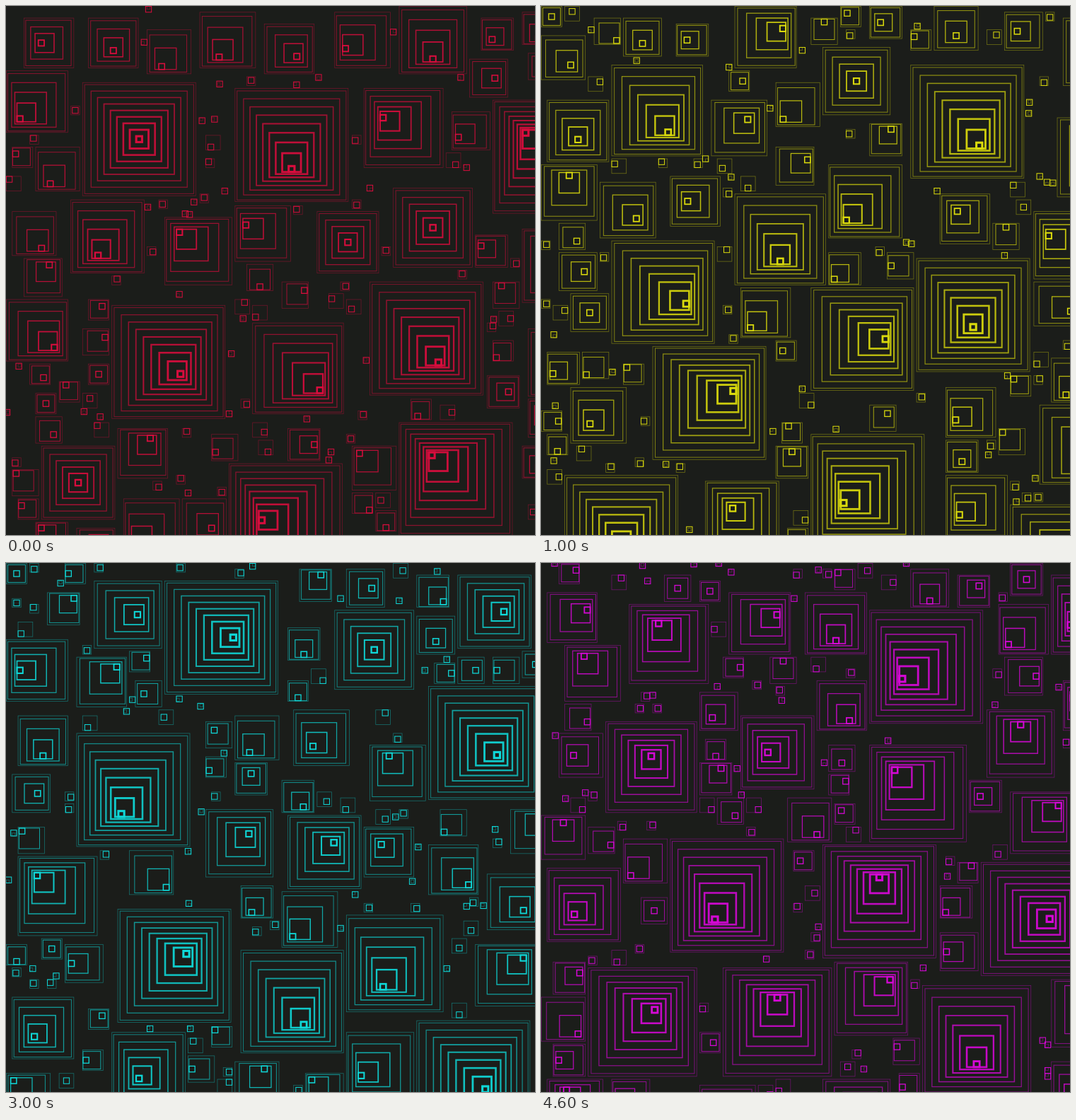
An HTML page with a canvas for the animation above (5000 ms loop, 748 by 748 pixels).

```html
<!DOCTYPE html>
<html lang="en">
<head>
<meta charset="utf-8">
<title>Nested squares</title>
<style>
  html, body { margin: 0; width: 100%; height: 100%; overflow: hidden; background: #1b1d1a; }
  canvas { display: block; }
</style>
</head>
<body>
<canvas id="stage" width="748" height="748"></canvas>
<script>
const SIZE = 748, UNIT = 8.29, CELLS = 90, HOLD = 1000;
const LARGEST = 19.8, LARGEST_FILL = 14;
const ctx = document.getElementById('stage').getContext('2d');

// Only the anchors are placed by hand, by size: column, row, drift.
// Drift has two digits, vertical then horizontal, 0 to 4, with 2 as the middle.
const scenes = [
  {
    color: '#d80d3d',
    anchors: {
      20: [13,13,22, 39,14,42, 83,16,0, 18,51,33, 62,47,43, 38,78,20, 67,71,0],
      16: [42,54,44]
    }
  },
  {
    color: '#dada0c',
    anchors: {
      20: [63,10,43, 64,43,32, 46,73,30, 4,80,32, 19,58,14],
      18: [12,40,34, 46,48,24],
      16: [12,10,43, 33,32,42]
    }
  },
  {
    color: '#dedede',
    anchors: {
      20: [32,4,4, 3,21,21, 81,15,12, 49,58,4, 18,58,41, 72,52,32],
      19: [25,28,22],
      18: [11,1,14],
      17: [58,35,1]
    }
  },
  {
    color: '#0fd8d8',
    anchors: {
      20: [27,3,23, 72,21,33, 12,29,41, 19,59,13, 70,78,33],
      18: [40,66,43],
      17: [58,60,41]
    }
  },
  {
    color: '#d608d6',
    anchors: {
      20: [56,8,30, 22,47,41, 48,48,2, 75,51,23],
      19: [8,69,13, 31,69,2, 65,72,42],
      17: [56,31,0],
      16: [11,27,12]
    }
  }
];

function seeded(seed) {
  return () => {
    seed = (seed + 0x6d2b79f5) | 0;
    let t = Math.imul(seed ^ (seed >>> 15), 1 | seed);
    t = (t + Math.imul(t ^ (t >>> 7), 61 | t)) ^ t;
    return ((t ^ (t >>> 14)) >>> 0) / 4294967296;
  };
}

function layout(anchors, seed) {
  const random = seeded(seed);
  const pick = n => Math.floor(random() * n);
  const used = new Set(), list = [];

  const cells = (x, y, n) => {
    const keys = [];
    for (let j = y; j < y + n; j++)
      for (let i = x; i < x + n; i++) keys.push(j * 200 + i);
    return keys;
  };
  const place = (x, y, n, mx, my) => {
    cells(x, y, n).forEach(key => used.add(key));
    list.push({ x, y, n: Math.min(n, LARGEST), mx, my });
  };

  for (const [n, row] of Object.entries(anchors))
    for (let i = 0; i < row.length; i += 3) {
      const drift = row[i + 2];
      place(row[i], row[i + 1], +n, drift % 10 - 2, Math.floor(drift / 10) - 2);
    }

  // Fill the gaps from large to small; smaller squares are more common.
  for (let n = LARGEST_FILL; n > 0; n--) {
    let count = Math.min(30, Math.round(56 / n ** 1.2));
    for (let tries = 0; count > 0 && tries < 1500; tries++) {
      const x = pick(CELLS), y = pick(CELLS);
      if (cells(x, y, n).some(key => used.has(key))) continue;
      place(x, y, n, pick(5) - 2, pick(5) - 2);
      count--;
    }
  }
  return list;
}

// Each inner square is smaller by one step and leans further along its drift.
function drawNest({ x, y, n, mx, my }) {
  const levels = Math.max(1, Math.floor(0.43 * n + 0.53));
  let px = x * UNIT + 0.5, py = y * UNIT + 0.5, side = (n - 0.5) * UNIT;
  for (let depth = 0; depth <= levels; depth++) {
    if (depth) {
      const left = levels - depth;
      const next = n * UNIT * left / levels + UNIT;
      const gap = (side - next) / 2;
      px += gap + gap / (left + 2) * mx;
      py += gap + gap / (left + 2) * my;
      side = next;
    }
    ctx.globalAlpha = 0.45 + 0.55 * depth / levels;
    ctx.lineWidth = 0.75 + 0.26 * depth;
    ctx.strokeRect(px, py, side, side);
  }
}

function drawScene({ color, list }) {
  ctx.globalAlpha = 1;
  ctx.fillStyle = '#1b1d1a';
  ctx.fillRect(0, 0, SIZE, SIZE);
  ctx.strokeStyle = color;
  list.forEach(drawNest);
}

scenes.forEach((scene, i) => { scene.list = layout(scene.anchors, 11 + 12 * i); });

const start = performance.now();
let shown = -1;
function tick() {
  const elapsed = Math.max(0, performance.now() - start);
  const index = Math.floor(elapsed / HOLD) % scenes.length;
  if (index !== shown) {
    shown = index;
    drawScene(scenes[index]);
  }
  requestAnimationFrame(tick);
}
tick();
</script>
</body>
</html>
```
